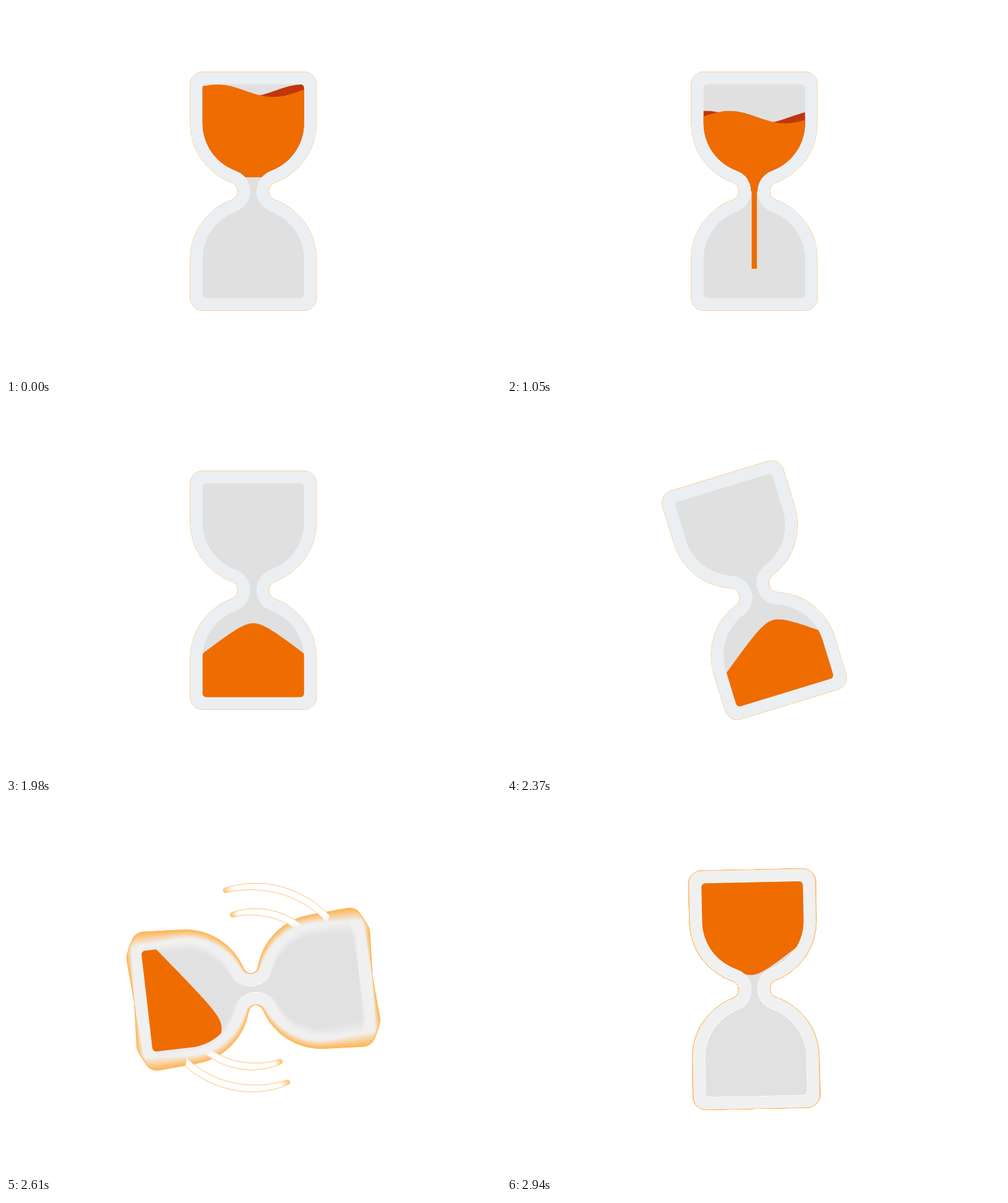
Recreate the animation shown at these times as an HTML page with a canvas. Size 800 by 600 pixels, loop 2970 ms.

```html
<!DOCTYPE html>
<html>
<head>
<meta charset="utf-8">
<style>
html, body { margin: 0; height: 100%; overflow: hidden; background: #fff; }
canvas { display: block; }
</style>
</head>
<body>
<canvas id="stage" width="800" height="600"></canvas>
<script>
const ctx = document.getElementById('stage').getContext('2d');
const blur = document.createElement('canvas').getContext('2d');
blur.canvas.width = 800;
blur.canvas.height = 600;

const LOOP = 2970, STEP = 30, CX = 399.7, CY = 299.5;
const SAND = '#ef6c00', SHADE = '#bf360c', RIM = '#ffb24d', GLASS = '#eceff1', HOLLOW = '#e0e0e0';
const { PI, cos, sin, hypot, min, max } = Math;
const rad = deg => deg * PI / 180;

// Hourglass outline around (0, 0), moved inwards by m
function outline(m) {
  const p = new Path2D(), x = 102 - m, y = 193 - m, c = 20 - m * 0.7, n = 15 + m;
  const b = Math.atan2(110, 40);
  p.moveTo(0, -y);
  p.arcTo(x, -y, x, 0, c);
  p.arc(0, -110, x, 0, b);
  p.arc(40, 0, n, PI + b, PI - b, true);
  p.arc(0, 110, x, -b, 0);
  p.arcTo(x, y, 0, y, c);
  p.arcTo(-x, y, -x, 0, c);
  p.arc(0, 110, x, PI, PI + b);
  p.arc(-40, 0, n, b, -b, true);
  p.arc(0, -110, x, PI - b, PI);
  p.arcTo(-x, -y, 0, -y, c);
  p.closePath();
  return p;
}
const outer = outline(0), inner = outline(20), ring = new Path2D(outer);
ring.addPath(inner);

// Hermite curve through [time, value, slope] keys
function track(t, keys) {
  if (t <= keys[0][0]) return keys[0][1];
  const i = keys.findIndex(k => k[0] > t);
  if (i < 0) return keys[keys.length - 1][1];
  const [t0, v0, s0] = keys[i - 1], [t1, v1, s1] = keys[i];
  const d = t1 - t0, u = (t - t0) / d, w = 1 - u;
  return w * w * (1 + 2 * u) * v0 + u * u * (3 - 2 * u) * v1 + u * w * d * (w * s0 - u * s1);
}

const TURN = [[2250, 0, -.15], [2370, -17, 0], [2610, 83.4, .55], [2790, 162, .28], [2940, 178.8, .05], [2970, 180, .03]];
const PEAK = [[1130, 173.5, -.12], [1440, 129.5, -.15], [1980, 53.5, -.12], [1981, 53.5, 0], [2250, 53.5, 0], [2370, 55, 0], [2610, 58, -.03], [2940, 23, -.1]];
const SLIDE = [[2250, 0, .1], [2370, 14, .15], [2610, 54, 0], [2940, 5, -.15]];

function rotated(c, deg, draw) {
  c.save();
  c.rotate(rad(deg));
  draw(c);
  c.restore();
}

// Fill from the curve y = f(x) down to the given bottom
function fillBelow(f, bottom, color) {
  ctx.beginPath();
  ctx.moveTo(-84, bottom);
  for (let x = -84; x <= 84; x += 2) ctx.lineTo(x, min(f(x), bottom));
  ctx.lineTo(84, bottom);
  ctx.fillStyle = color;
  ctx.fill();
}

// Band that narrows towards its rounded tail
function swoosh(radius, head, tail) {
  const tip = ctx.createConicGradient(tail - 0.05, 0, 0);
  tip.addColorStop(0, RIM);
  tip.addColorStop(0.02, '#fff');
  const at = (u, side) => {
    const a = tail + (head - tail) * u, r = radius + side * (3.8 + 1.9 * min(1, u * 3));
    ctx.lineTo(r * cos(a), r * sin(a));
  };
  ctx.beginPath();
  for (let u = 1; u > 0; u -= 0.04) at(u, -1);
  ctx.arc(radius * cos(tail), radius * sin(tail), 3.8, tail + PI, tail + 2 * PI);
  for (let u = 0; u < 1; u += 0.04) at(u, 1);
  ctx.fillStyle = tip;
  ctx.fill();
  ctx.strokeStyle = RIM;
  ctx.lineWidth = 0.8;
  ctx.stroke();
}

function drawSwooshes(t, angle) {
  const p = (t - 2460) / 300;
  if (p <= 0 || p >= 1) return;
  const length = 64 * sin(PI * p), head = angle - 125;
  if (length < 5) return;
  for (const [radius, turn] of [[166, 0], [125, 0], [160.5, 175.5], [125, 175.5]]) {
    swoosh(radius, rad(head + turn), rad(head + turn - length));
  }
}

function fillGlass(c) {
  c.fillStyle = GLASS;
  c.fill(ring, 'evenodd');
  c.fillStyle = HOLLOW;
  c.fill(inner);
}

function drawRim() {
  ctx.fillStyle = ctx.strokeStyle = RIM;
  ctx.lineWidth = 0.9;
  ctx.fill(outer);
  ctx.stroke(outer);
}

function drawGlass(t, angle) {
  const from = track(t - 6.5, TURN), to = track(t + 6.5, TURN);
  if (Math.abs(to - from) < 0.5) {
    rotated(ctx, angle, () => {
      drawRim();
      ctx.fillStyle = GLASS;
      ctx.fill(outer);
      ctx.fillStyle = HOLLOW;
      ctx.fill(inner);
    });
    return;
  }
  // Motion blur: the mean of n poses over the orange area they sweep
  const n = 15;
  blur.clearRect(0, 0, 800, 600);
  blur.save();
  blur.translate(CX, CY);
  blur.globalCompositeOperation = 'lighter';
  blur.globalAlpha = 1 / n;
  for (let i = 0; i < n; i++) {
    const pose = from + (to - from) * i / (n - 1);
    rotated(ctx, pose, drawRim);
    rotated(blur, pose, fillGlass);
  }
  blur.restore();
  drawSwooshes(t, angle);
  ctx.drawImage(blur.canvas, -CX, -CY);
}

function drawUpperSand(t) {
  const late = max(0, t - 1440);
  const level = -162.5 + 99 * (min(t, 1440) / 1440) ** 2.66 + 0.183 * late + 0.0015 * late * late;
  const tip = min(173.5, -22.5 + 130 * (t / 1000) ** 2.66);
  const front = 32 + 0.36 * t, back = front - 28 - 14 * cos(2 * PI * t / 1200);
  const wave = trough => x => level + 10 * cos(2 * PI * (x - trough) / 180);
  const bottom = min(tip, 0), top = max(level, -23);
  if (level < bottom) {
    ctx.save();
    ctx.clip(inner);
    fillBelow(wave(back), bottom, SHADE);
    fillBelow(wave(front), bottom, SAND);
    ctx.restore();
  }
  ctx.fillStyle = SAND;
  if (top < tip) ctx.fillRect(-4.2, top, 8.4, tip - top);
}

function drawPile(t) {
  const peak = track(t, PEAK), slide = track(t, SLIDE);
  if (peak >= 173) return;
  ctx.save();
  ctx.clip(inner);
  fillBelow(x => peak + hypot(18, 0.787 * (x - slide)) - 18, 180, SAND);
  ctx.restore();
}

function render() {
  const t = Math.floor(performance.now() % LOOP / STEP) * STEP;
  const angle = track(t, TURN);
  ctx.clearRect(0, 0, 800, 600);
  ctx.save();
  ctx.translate(CX, CY);
  drawGlass(t, angle);
  rotated(ctx, angle, () => {
    if (t < 2250) drawUpperSand(t);
    drawPile(t);
  });
  ctx.restore();
  requestAnimationFrame(render);
}
render();
</script>
</body>
</html>
```
